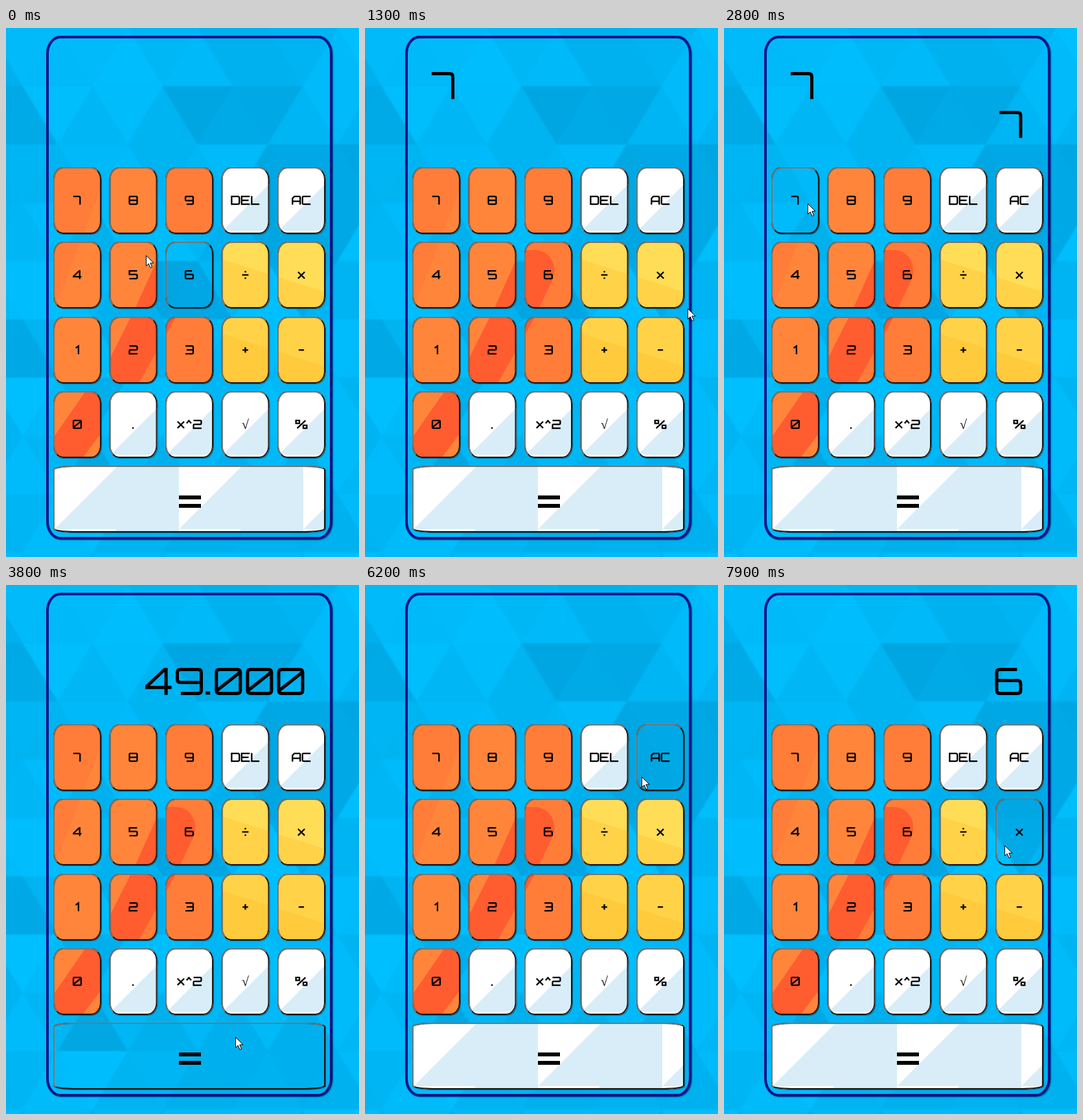
Write an HTML page with a canvas that moves like this. It is 545 by 817 pixels and loops after 8000 ms.

```html
<!DOCTYPE html>
<html lang="en">
<head>
<meta charset="utf-8">
<title>Calculator</title>
<style>
html, body { margin: 0; width: 100%; height: 100%; overflow: hidden; background: #00b4f2; }
canvas { display: block; width: 545px; height: 817px; }
</style>
</head>
<body>
<canvas id="stage" width="545" height="817" role="img" aria-label="Calculator"></canvas>
<script>
const W = 545, H = 817, LOOP = 8000, STEP = 100;
const ctx = document.getElementById('stage').getContext('2d');

// Square stroke font: [width, path] on a grid ten units high.
const BOX = 'M1.3 0H8.7Q10 0 10 1.3V8.7Q10 10 8.7 10H1.3Q0 10 0 8.7V1.3Q0 0 1.3 0Z';
const GLYPHS = {
  0: [10, BOX + 'M.3 8.7L9.7 1.3'],
  1: [4, 'M0 2.6L3.6 0V10.6'],
  2: [10, 'M0 0H8.7Q10 0 10 1.3V3.7Q10 5 8.7 5H1.3Q0 5 0 6.3V10H10.4'],
  3: [10, 'M0 0H8.7Q10 0 10 1.3V8.7Q10 10 8.7 10H0M1.5 5H10'],
  4: [9.7, 'M10.3 7.5H0V7L7.4 0H8V10.6'],
  5: [10, 'M10 0H0V4.6H8.7Q10 4.6 10 5.9V8.7Q10 10 8.7 10H0'],
  6: [10, 'M8.5 0H1.3Q0 0 0 1.3V8.7Q0 10 1.3 10H8.7Q10 10 10 8.7V5.9Q10 4.6 8.7 4.6H0'],
  7: [7.3, 'M-1.5 0H6Q7.3 0 7.3 1.3V10.6'],
  8: [10, BOX + 'M0 5H10'],
  9: [10, 'M1.5 10H8.7Q10 10 10 8.7V1.3Q10 0 8.7 0H1.3Q0 0 0 1.3V4.1Q0 5.4 1.3 5.4H10'],
  D: [10, 'M0 0H8Q10 0 10 2V8Q10 10 8 10H0Z'],
  E: [10, 'M10.5 0H0V10H10.5M0 5H9'],
  L: [9.5, 'M0 -.6V10H10'],
  A: [10, 'M0 10.6V2.6L2.4 0H8.7Q10 0 10 1.3V10.6M0 6.2H10'],
  C: [10, 'M10.5 0H1.3Q0 0 0 1.3V8.7Q0 10 1.3 10H10.5'],
  x: [9, 'M.2 1.3L8.8 9.8M8.8 1.3L.2 9.8'],
  '^': [6, 'M0 3.6L3 .3L6 3.6'],
  '.': [.3, 'M-1.2 9.8H.7'],
  '+': [6.5, 'M-.4 5.2H6.9M3.25 1.6V8.8'],
  '-': [6.5, 'M-.2 5.2H6.7'],
  '÷': [7.5, 'M-.4 5.2H7.9M2.8 1H4.8M2.8 9.5H4.8'],
  '%': [14, 'M0 0H4.5V3.8H0ZM9.5 6.2H14V10H9.5ZM12.4 0L1.6 10']
};
const GAP = 3;
const paths = {};
for (const c in GLYPHS) paths[c] = new Path2D(GLYPHS[c][1]);

// align: 0 left, 0.5 centre, 1 right
function label(text, x, y, height, weight, align) {
  const s = (height - weight) / 10;
  let units = -GAP;
  for (const c of text) units += GLYPHS[c][0] + GAP;
  ctx.save();
  ctx.translate(x - (units * s + weight) * align + weight / 2, y + weight / 2);
  ctx.scale(s, s);
  ctx.lineWidth = weight / s;
  ctx.strokeStyle = '#000';
  for (const c of text) {
    ctx.stroke(paths[c]);
    ctx.translate(GLYPHS[c][0] + GAP, 0);
  }
  ctx.restore();
}

function poly(c, color, ...pts) {
  c.beginPath();
  for (let i = 0; i < pts.length; i += 2) c.lineTo(pts[i], pts[i + 1]);
  c.closePath();
  c.fillStyle = color;
  c.fill();
}

function randomFrom(seed) {
  return () => (seed = (seed * 16807) % 2147483647) / 2147483647;
}

// Backdrop: triangles of random brightness, dimmed around a few spots.
const SHADOWS = [
  [345, 135, 75], [462, 300, 100], [280, 390, 60], [10, 470, 45],
  [5, 130, 50], [530, 215, 40], [110, 700, 50]
];
function makeBackdrop() {
  const flat = document.createElement('canvas');
  flat.width = W;
  flat.height = H;
  const c = flat.getContext('2d');
  const random = randomFrom(4711);
  c.fillStyle = '#00b4f2';
  c.fillRect(0, 0, W, H);
  for (let r = 0; r < 10; r++) {
    for (let i = -1; i < 11; i++) {
      const x = -28 + 54 * i, top = r * 90, down = (i + r) % 2 === 0;
      const base = down ? top : top + 90, tip = down ? top + 90 : top;
      const dim = SHADOWS.some(([sx, sy, size]) => Math.hypot(x + 54 - sx, (base * 2 + tip) / 3 - sy) < size);
      const light = dim ? random() * .25 : .4 + random() * .6;
      poly(c, `rgb(0,${164 + light * 27},${224 + light * 31})`, x - .4, base, x + 108.4, base, x + 54, tip);
    }
  }
  return flat;
}
const backdrop = makeBackdrop();

// Key faces share artwork that spans the whole pad.
function orange() {
  ctx.fillStyle = '#ff7d38';
  ctx.fillRect(60, 200, 270, 480);
  poly(ctx, '#ff853b', 165, 200, 247, 200, 247, 460, 130, 680, -20, 680);
  ctx.beginPath();
  ctx.moveTo(240, 343);
  ctx.lineTo(264, 343);
  ctx.bezierCurveTo(284, 344, 298, 364, 290, 388);
  for (const [x, y] of [[262, 447], [206, 547], [118, 664], [60, 664], [75, 630],
                        [122, 562], [148, 535], [200, 432]]) ctx.lineTo(x, y);
  ctx.closePath();
  ctx.fillStyle = '#ff5c30';
  ctx.fill();
}

function yellow() {
  ctx.fillStyle = '#ffdd57';
  ctx.fillRect(320, 320, 190, 240);
  const band = (color, y) => poly(ctx, color, 320, y, 510, y + 60, 510, 560, 320, 560);
  band('#ffd248', 353);
  band('#ffca3c', 468);
}

function white(k) {
  ctx.fillStyle = '#fff';
  ctx.fillRect(k.x, k.y, k.w, k.h);
  for (let y = k.y + 2; y < k.y + k.h; y += 96)
    for (let x = k.x + 2; x < k.x + k.w; x += 192)
      poly(ctx, '#d8edf8', x + 96, y, x + 192, y, x + 192, y + 96, x, y + 96);
}

const ROWS = [
  ['7', '8', '9', 'DEL', 'AC'],
  ['4', '5', '6', '÷', 'x'],
  ['1', '2', '3', '+', '-'],
  ['0', '.', 'x^2', '√', '%']
];
const LEFT = 73, TOP = 215, COL = 86.5, ROW = 115.25;
const keys = [];
function addKey(name, col, row, w, rx, ry) {
  const x = LEFT + col * COL, y = Math.round(TOP + row * ROW), h = 103;
  const face = /^\d$/.test(name) ? orange : '÷x+-'.includes(name) ? yellow : white;
  const outer = new Path2D(), rim = new Path2D();
  outer.roundRect(x, y, w, h, { x: rx, y: ry });
  rim.roundRect(x + 1, y + 1, w - 2, h - 2, { x: rx - 1, y: ry - 1 });
  keys.push({ name, x, y, w, h, face, outer, rim });
}
ROWS.forEach((names, row) => names.forEach((name, col) => addKey(name, col, row, 74, 15, 19)));
addKey('=', 0, 4, 420, 32, 6);

function outerShadow(path, offset, blur, color) {
  const outside = new Path2D();
  outside.rect(0, 0, W, H);
  outside.addPath(path);
  ctx.save();
  ctx.clip(outside, 'evenodd');
  ctx.shadowColor = color;
  ctx.shadowOffsetX = ctx.shadowOffsetY = offset;
  ctx.shadowBlur = blur;
  ctx.fillStyle = '#000';
  ctx.fill(path);
  ctx.restore();
}

function drawKey(k, hovered) {
  const { x, y, w, h } = k;
  outerShadow(k.outer, 1, 1, 'rgba(0,0,0,.5)');
  if (!hovered) {
    ctx.save();
    ctx.clip(k.outer);
    k.face(k);
    ctx.restore();
  }
  ctx.lineWidth = 2;
  ctx.strokeStyle = '#1a1a1a';
  ctx.stroke(k.rim);
  ctx.save();
  ctx.beginPath();
  for (const [px, py] of [[x, y + h], [x, y], [x + w, y], [x + w - 20, y + 20], [x + 20, y + h - 20]]) ctx.lineTo(px, py);
  ctx.clip();
  ctx.strokeStyle = '#767676';
  ctx.stroke(k.rim);
  ctx.restore();

  const cx = x + w / 2, cy = y + 51;
  ctx.fillStyle = '#000';
  if (k.name === '=') {
    ctx.fillRect(cx - 16, cy - 5, 34, 6);
    ctx.fillRect(cx - 16, cy + 8, 34, 6);
  } else if (k.name === '√') {
    ctx.font = '20px "Liberation Serif", serif';
    ctx.textAlign = 'center';
    ctx.fillText('√', cx, cy + 7);
  } else {
    label(k.name, cx, cy - 7, 14.2, 2.3, .5);
  }
}

const panel = new Path2D(), panelEdge = new Path2D();
panel.roundRect(62, 12, 442, 778, { x: 22, y: 28 });
panelEdge.roundRect(64, 14, 438, 774, { x: 20, y: 26 });

const arrow = new Path2D('M.5 .5V16.5L4.2 13L7 19.5L9.6 18.4L6.8 12H12Z');
function drawCursor(x, y) {
  ctx.save();
  ctx.translate(x, y);
  ctx.fillStyle = '#fff';
  ctx.fill(arrow);
  ctx.lineWidth = 1;
  ctx.strokeStyle = '#000';
  ctx.stroke(arrow);
  ctx.restore();
}

// Pointer moves: [start ms, end ms, x, y], each easing out to its goal.
const ORIGIN = [257, 386];
const MOVES = [
  [-100, 500, 122, 272], [600, 1200, 498, 433], [1300, 1600, 448, 390],
  [1800, 2400, 190, 281], [2600, 2800, 129, 271], [2900, 3800, 354, 698],
  [4700, 5000, 441, 322], [5000, 5200, 432, 292], [5800, 5900, 427, 296],
  [6200, 6800, 284, 384], [7100, 7700, 433, 402]
];
function pointerAt(t) {
  let [x, y] = ORIGIN;
  for (const [start, end, goalX, goalY] of MOVES) {
    const f = Math.min(1, Math.max(0, (t - start) / (end - start)));
    const eased = 1 - (1 - f) ** 2;
    x += (goalX - x) * eased;
    y += (goalY - y) * eased;
  }
  return [Math.round(x), Math.round(y)];
}

// Presses: [ms, typed entry, result].
const SCREEN = [
  [0, '', ''], [700, '7', ''], [1800, '', '7'], [2800, '7', '7'],
  [3700, '', '49.000'], [5800, '', ''], [7000, '6', ''], [7900, '', '6']
];

function draw(t) {
  ctx.drawImage(backdrop, 0, 0);
  ctx.filter = 'blur(1px)';
  ctx.drawImage(backdrop, 0, 0);
  ctx.filter = 'none';

  outerShadow(panel, 1, 2, 'rgba(0,0,0,.5)');
  ctx.lineWidth = 4;
  ctx.strokeStyle = '#00128a';
  ctx.stroke(panelEdge);

  // Highlighting trails the pointer by one step.
  const [hx, hy] = pointerAt(t - STEP);
  for (const k of keys) {
    drawKey(k, hx >= k.x && hx < k.x + k.w && hy >= k.y && hy < k.y + k.h);
  }

  const [, entry, result] = SCREEN.findLast(press => press[0] <= t);
  label(entry, 106, 68, 42, 5, 0);
  label(result, 460.5, 128, 42, 5, 1);
  drawCursor(...pointerAt(t));
}

const start = performance.now();
let shown = -1;
function tick() {
  const t = Math.floor((performance.now() - start) % LOOP / STEP) * STEP;
  if (t !== shown) draw(shown = t);
  requestAnimationFrame(tick);
}
draw(shown = 0);
requestAnimationFrame(tick);
</script>
</body>
</html>
```
